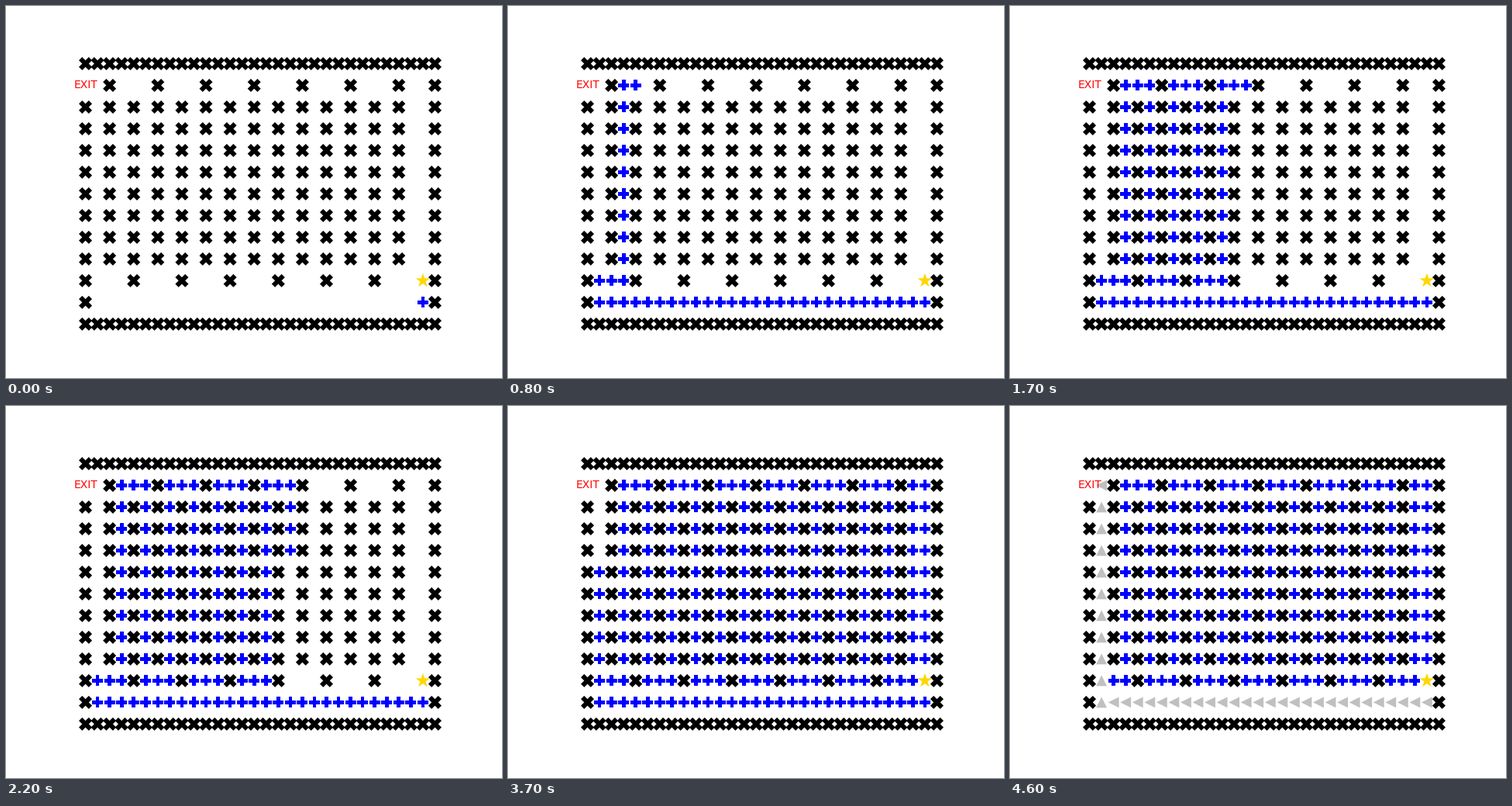
A matplotlib script for the animation above (4700 ms loop, 640 by 480 pixels).

```python
import matplotlib.pyplot as plt
import numpy as np
from matplotlib.animation import FuncAnimation

COLS, ROWS = 30, 13
START, EXIT = (28, 10), (0, 1)
DOWN, LEFT, RIGHT, UP = (0, 1), (-1, 0), (1, 0), (0, -1)
FRAMES, INTERVAL, STEPS = 47, 100, 5


def is_wall(c, r):
    if (c, r) == EXIT:
        return False
    if r in (0, ROWS - 1) or c in (0, COLS - 1):
        return True
    if c % 2 or c > 26:
        return False
    # Pillars alternate between a gap at the top and one at the bottom.
    return 2 <= r <= 9 or (r == 1 and c % 4 == 2) or (r == 10 and c % 4 == 0)


def search():
    """Depth-first search; returns cells in visiting order and the way out."""
    visited, path = [START], [START]
    while path[-1] != EXIT:
        c, r = path[-1]
        for dc, dr in (DOWN, LEFT, RIGHT, UP):
            cell = (c + dc, r + dr)
            if not is_wall(*cell) and cell not in visited:
                visited.append(cell)
                path.append(cell)
                break
        else:
            path.pop()
    return visited, path


visited, path = search()
trail = visited[1:-1]
arrows = [(cell, nxt[0] < cell[0]) for cell, nxt in zip(path[1:-1], path[2:])]

fig = plt.figure(figsize=(6.4, 4.8), dpi=100, facecolor="white")
ax = fig.add_subplot()
ax.axis("off")
ax.set_xlim(-1.45, 30.45)
ax.set_ylim(12.6, -0.6)


def marks(marker, color, cells=(), size=100):
    pts = np.array(cells, float).reshape(-1, 2)
    return ax.scatter(pts[:, 0], pts[:, 1], s=size, marker=marker,
                      color=color, edgecolors="none")


walls = [(c, r) for r in range(ROWS) for c in range(COLS) if is_wall(c, r)]
marks("X", "black", walls, 150)
marks("*", "gold", [START], 200)
ax.text(*EXIT, "EXIT", color="red", fontsize=10, ha="center", va="center")
plus = marks("P", "blue")
left = marks("<", "silver")
up = marks("^", "silver")


def show(artist, cells):
    artist.set_offsets(np.array(cells, float).reshape(-1, 2))


def update(i):
    n = 1 + STEPS * i
    drawn = arrows[:max(0, n - len(trail))]
    covered = {cell for cell, _ in drawn}
    show(plus, [cell for cell in trail[:n] if cell not in covered])
    show(left, [cell for cell, is_left in drawn if is_left])
    show(up, [cell for cell, is_left in drawn if not is_left])
    return plus, left, up


anim = FuncAnimation(fig, update, frames=FRAMES, interval=INTERVAL,
                     repeat=True, repeat_delay=0)
plt.show()
```
